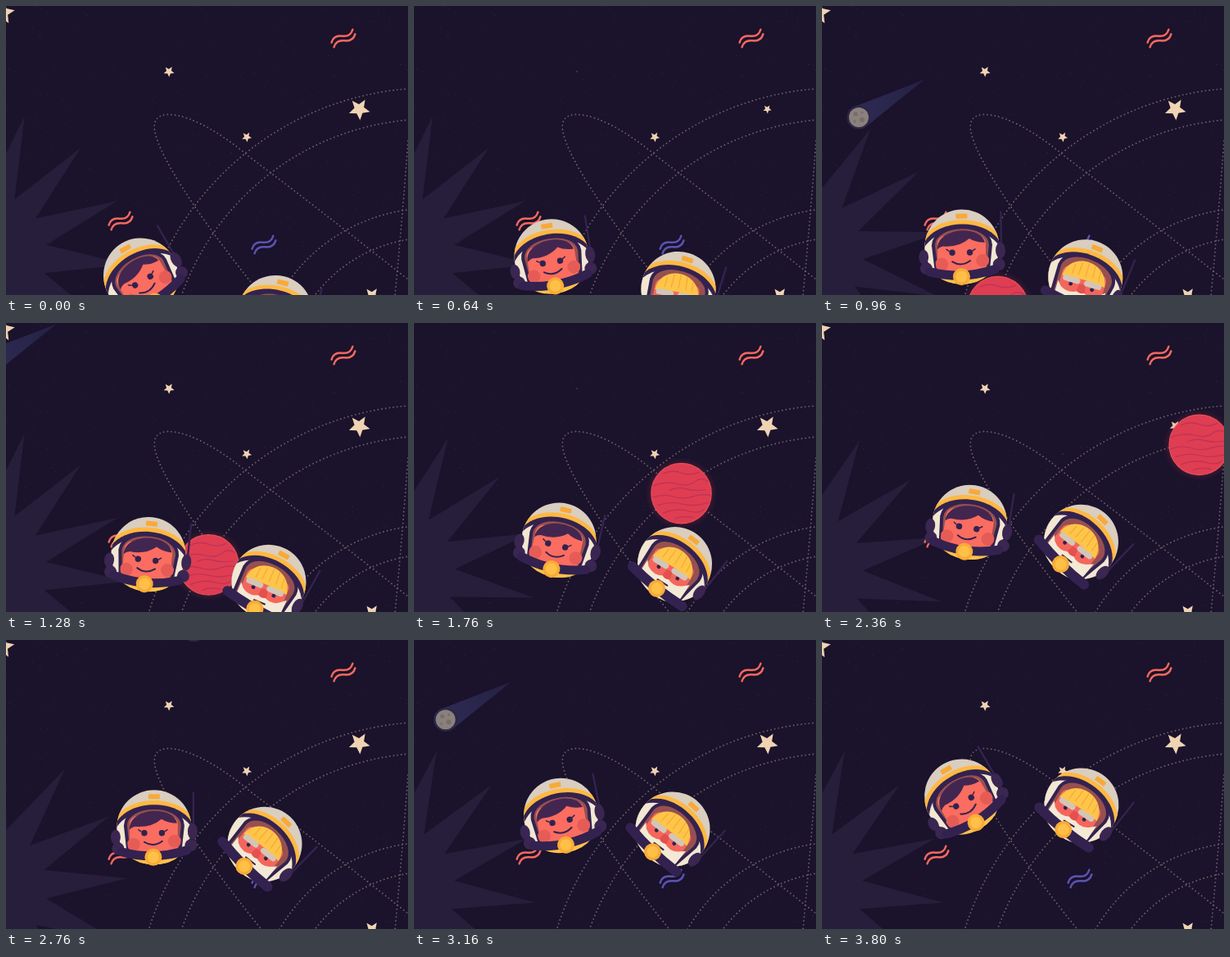
Write an HTML page that moves like this. It is 491 by 353 pixels and loops after 3840 ms.

```html
<!DOCTYPE html>
<html lang="en">
<head>
<meta charset="utf-8">
<title>Astronauts</title>
<style>
html, body { margin: 0; width: 100%; height: 100%; overflow: hidden; background: #1b122b; }
svg { display: block; width: 491px; height: 353px; }
</style>
</head>
<body>
<svg viewBox="0 0 491 353" width="491" height="353">
  <defs>
    <radialGradient id="glow">
      <stop offset=".78" stop-color="#d8384f" stop-opacity=".2"/>
      <stop offset="1" stop-color="#d8384f" stop-opacity="0"/>
    </radialGradient>
    <linearGradient id="tailFill" gradientUnits="userSpaceOnUse" x1="0" y1="0" x2="80" y2="-46">
      <stop offset="0" stop-color="#2e2a52"/>
      <stop offset="1" stop-color="#242145"/>
    </linearGradient>
    <clipPath id="ball"><circle r="36"/></clipPath>
    <clipPath id="shell"><circle r="45.5"/></clipPath>
    <clipPath id="visor"><path d="M-35 -2C-34 -31 34 -31 35 -2L31 34H-31Z"/></clipPath>

    <g id="comet">
      <path d="M-8 -12L80 -46L8 12Z" fill="url(#tailFill)"/>
      <circle r="14.5" fill="#2c2748"/>
      <circle r="12" fill="#8a817c"/>
      <g fill="#776e6c">
        <circle cx="-4" cy="-4" r="2.6"/><circle cx="4" cy="3" r="3"/>
        <circle cx="-5" cy="5" r="1.6"/><circle cx="4" cy="-6" r="1.5"/>
      </g>
    </g>

    <g id="wave" fill="none" stroke-width="2.5" stroke-linecap="round">
      <path id="ripple" d="M-15 2C-10 -4 -5 -3 0 0S10 4 15 -2" transform="translate(-1.5 -3.3) rotate(-24)"/>
      <use href="#ripple" x="3" y="5.6"/>
    </g>

    <g id="helmet">
      <path d="M48 3V-42" stroke="#33234f" stroke-width="2.4" stroke-linecap="round"/>
      <g clip-path="url(#shell)">
        <rect x="-46" y="-46" width="92" height="92" fill="#d9cebf"/>
        <path d="M-50 -2C-42 -43 42 -43 50 -2V50H-50Z" fill="#ffb842"/>
        <path d="M-50 4C-41 -38 41 -38 50 4V50H-50Z" fill="#33224f"/>
        <path d="M-50 10C-40 -31 40 -31 50 10V50H-50Z" fill="#f1e7d3"/>
      </g>
      <path d="M-35 -2C-34 -31 34 -31 35 -2L31 34H-31Z" fill="#97504f" stroke="#33224f" stroke-width="4"/>
      <rect id="badge" x="-7" y="-40.5" width="14" height="6" rx="1" fill="#f9a937"/>
    </g>

    <g id="brooch">
      <circle r="10.5" fill="#f9ab36"/><circle r="7" fill="#ffc047"/>
    </g>
  </defs>

  <rect width="491" height="353" fill="#1b122b"/>
  <path id="sun" fill="#261e3b"/>
  <path id="grain" stroke="#2c2340" stroke-width="1.1" stroke-linecap="round"/>

  <g fill="none" stroke="#6a5f66" stroke-width="1.9" stroke-linecap="round" stroke-dasharray="0 4.7">
    <circle cx="519" cy="461" r="361"/>
    <circle cx="519" cy="461" r="323"/>
    <circle cx="519" cy="461" r="214"/>
    <circle cx="519" cy="461" r="178"/>
    <path d="M313 355C275 307 240 262 210 213C190 180 175 150 184 138C195 124 240 136 297 184C360 231 420 278 491 334"/>
    <path d="M491 165Q484 260 475 355"/>
  </g>

  <g id="stars" fill="#efd3b2"></g>
  <g id="comets"></g>

  <use href="#wave" x="412" y="40" stroke="#f4695f"/>
  <use href="#wave" x="140" y="263" stroke="#f4695f"/>
  <use href="#wave" x="315" y="292" stroke="#5a55b2"/>

  <g id="planet">
    <circle r="44" fill="url(#glow)"/>
    <circle r="36.7" fill="#df3d52" stroke="#e65157" stroke-width="1.2"/>
    <g clip-path="url(#ball)" fill="none" stroke="#bd3257" stroke-width="1.2" stroke-linecap="round" transform="rotate(-5)">
      <path d="M-20 -26Q-8 -30 2 -25T24 -24"/>
      <path d="M-34 -12Q-18 -17 -4 -12T18 -13T36 -10"/>
      <path d="M-14 -5Q-4 -9 6 -5T30 -2"/>
      <path d="M-36 2Q-22 -2 -10 3T14 5T36 6"/>
      <path d="M-30 12Q-14 8 0 13T32 14"/>
      <path d="M-24 22Q-8 17 6 22T26 22"/>
      <path d="M-10 30Q0 27 12 31"/>
    </g>
  </g>

  <g id="man">
    <use href="#helmet"/>
    <g clip-path="url(#visor)">
      <g transform="rotate(-6)">
        <rect x="-29" y="-8" width="55" height="48" rx="8" fill="#f4665c"/>
        <path d="M-28 6C-27 -26 22 -27 26 6Q0 2 -28 6Z" fill="#ffc548"/>
        <path d="M-17 1L-16 -12M-9 0L-8 -16M0 0V-17M9 0L8 -16M17 1L16 -12" stroke="#f2a93a" stroke-width="1.2"/>
        <path d="M-31 13L-26 19Q-15 26 -4 19H2Q13 25 22 18L29 12L28 40H-31Z" fill="#f3e9d5"/>
        <circle cx="-15" cy="13" r="2.4" fill="#33224f"/>
        <circle cx="12" cy="13" r="2.4" fill="#33224f"/>
        <path d="M-23 7.5H-8M4 7.5H19" stroke="#d3c6b8" stroke-width="7" stroke-linecap="round"/>
        <path d="M-5 11Q-1 9 3 11L5 19Q-1 23 -6 19Z" fill="#e4504f"/>
        <path d="M-8 27H6" stroke="#33224f" stroke-width="2" stroke-linecap="round"/>
      </g>
    </g>
    <path d="M-31 35H31Q20 45.500 0 45.500T-31 35Z" fill="#f6e2bd"/>
    <ellipse cx="45" cy="9" rx="6" ry="10" fill="#3a2651"/>
    <path d="M-39 34Q0 39 39 35" fill="none" stroke="#33224f" stroke-width="12" stroke-linecap="round"/>
    <use href="#brooch" x="1" y="37"/>
  </g>

  <g id="woman">
    <use href="#helmet"/>
    <g clip-path="url(#visor)">
      <rect x="-30" y="-14" width="59" height="54" rx="10" fill="#fa6d60"/>
      <circle cx="-25" cy="21" r="8" fill="#e55c57"/>
      <circle cx="25" cy="17" r="8" fill="#e55c57"/>
      <path d="M-30 3C-31 -25 24 -27 28 -5Q17 -5 9 -10Q-4 1 -23 -1Q-28 0 -30 3Z" fill="#432650"/>
      <g fill="none" stroke="#33224f" stroke-width="1.5" stroke-linecap="round">
        <path d="M-16 5L-19 3M13 5L16 3"/>
        <path d="M-12 18Q-1 25 10 17" stroke-width="2"/>
      </g>
      <circle cx="-12" cy="7" r="3.7" fill="#33224f"/>
      <circle cx="9.500" cy="7" r="3.700" fill="#33224f"/>
    </g>
    <path d="M-31 35H31Q20 45.500 0 45.500T-31 35Z" fill="#ffc14b"/>
    <g fill="#3a2651">
      <ellipse cx="-47" cy="12" rx="6" ry="9"/><ellipse cx="47" cy="5" rx="6" ry="10"/>
      <circle cx="-44" cy="26" r="7.5"/><circle cx="45" cy="22" r="7.5"/>
    </g>
    <path d="M-40 30Q0 41 40 28" fill="none" stroke="#33224f" stroke-width="11" stroke-linecap="round"/>
    <use href="#brooch" x="-1" y="36.500"/>
  </g>
</svg>
<script>
const LOOP = 3840;
const RAD = Math.PI / 180;
const $ = id => document.getElementById(id);
const place = (el, x, y, more = '') =>
  el.setAttribute('transform', `translate(${x.toFixed(2)} ${y.toFixed(2)}) ${more}`);

function add(parent, tag, attrs) {
  const el = document.createElementNS('http://www.w3.org/2000/svg', tag);
  for (const k in attrs) el.setAttribute(k, attrs[k]);
  return parent.appendChild(el);
}

function starPath(points, outer, inner) {
  let d = '';
  for (let i = 0; i < points * 2; i++) {
    const a = i * Math.PI / points, r = i % 2 ? inner : outer;
    d += (i ? 'L' : 'M') + (r * Math.sin(a)).toFixed(2) + ' ' + (-r * Math.cos(a)).toFixed(2);
  }
  return d + 'Z';
}

// Smooth curve through values at uneven times
function curve(times, vals) {
  const last = times.length - 1;
  const slope = i => {
    const a = Math.max(i - 1, 0), b = Math.min(i + 1, last);
    return (vals[b] - vals[a]) / (times[b] - times[a]);
  };
  return t => {
    let i = 0;
    while (i < last - 1 && t > times[i + 1]) i++;
    const h = times[i + 1] - times[i], u = (t - times[i]) / h, v = 1 - u;
    return vals[i] * (1 + 2 * u) * v * v + slope(i) * h * u * v * v
      + vals[i + 1] * u * u * (3 - 2 * u) - slope(i + 1) * h * u * u * v;
  };
}

const times = [0, 640, 1280, 1760, 2360, 3160, LOOP];
const crew = [
  { el: $('woman'), y: 329, rise: .0363,
    x: curve(times, [164.5, 168, 174, 177, 180.5, 179.5, 170]),
    turn: curve(times, [-30, -9, 6, 13, 9, -11, -31.5]) },
  { el: $('man'), y: 374.5, rise: .0454,
    x: curve(times, [329, 323, 321, 318.5, 316.5, 316, 317]),
    turn: curve(times, [14, 17, 29, 38, 44, 43, 38]) }
];

// Twinkle: shrinks to nothing at `low`, again every `every`, over `fade` ms
const stars = [
  { x: 199, y: 80, r: 6.8, tilt: 34, low: 560, every: 1280, fade: 400 },
  { x: 294, y: 160, r: 6.3, tilt: 30, low: 400, every: 1920, fade: 220 },
  { x: 431.5, y: 126, r: 13.5, tilt: 32, low: 550, every: 960, fade: 210 },
  { x: -4, y: 8, r: 15, tilt: 7, low: 560, every: 1280, fade: 400 },
  { x: 447, y: 354, r: 10.5, tilt: 34, low: 360, every: 1400, fade: 240 }
];
for (const s of stars) s.el = add($('stars'), 'path', { d: starPath(5, s.r, s.r * .45) });

const comets = [
  { x: 198, y: 48, at: 640 },
  { x: -18, y: 47, at: 1280 },
  { x: 39, y: 97, at: 3160 }
];
for (const c of comets) c.el = add($('comets'), 'use', { href: '#comet' });

$('sun').setAttribute('d', starPath(14, 177, 78));

let seed = 7;
const rand = () => (seed = seed * 16807 % 2147483647) / 2147483647;
let specks = '';
for (let i = 0; i < 600; i++) specks += `M${(rand() * 491).toFixed(1)} ${(rand() * 353).toFixed(1)}h.1`;
$('grain').setAttribute('d', specks);

function draw(t) {
  place($('sun'), -28, 304, `rotate(${16.7 - t / 640 * 360 / 14})`);

  for (const s of stars) {
    const m = (t - s.low + s.every * 4) % s.every;
    const u = Math.min(1, Math.min(m, s.every - m) / s.fade);
    place(s.el, s.x, s.y, `rotate(${s.tilt}) scale(${u * u * (3 - 2 * u)})`);
  }

  for (const c of comets) {
    const d = (t - c.at) * .55;
    place(c.el, c.x - d * .867, c.y + d * .498);
  }

  const a = (31.5 + (t - 1280) * .0444) * RAD;
  place($('planet'), 518.8 - 318.5 * Math.cos(a), 462 - 318.5 * Math.sin(a));

  for (const c of crew) place(c.el, c.x(t), c.y - c.rise * t, `rotate(${c.turn(t).toFixed(2)})`);
}

const start = performance.now();
function tick() {
  draw((performance.now() - start) % LOOP);
  requestAnimationFrame(tick);
}
draw(0);
requestAnimationFrame(tick);
</script>
</body>
</html>
```
